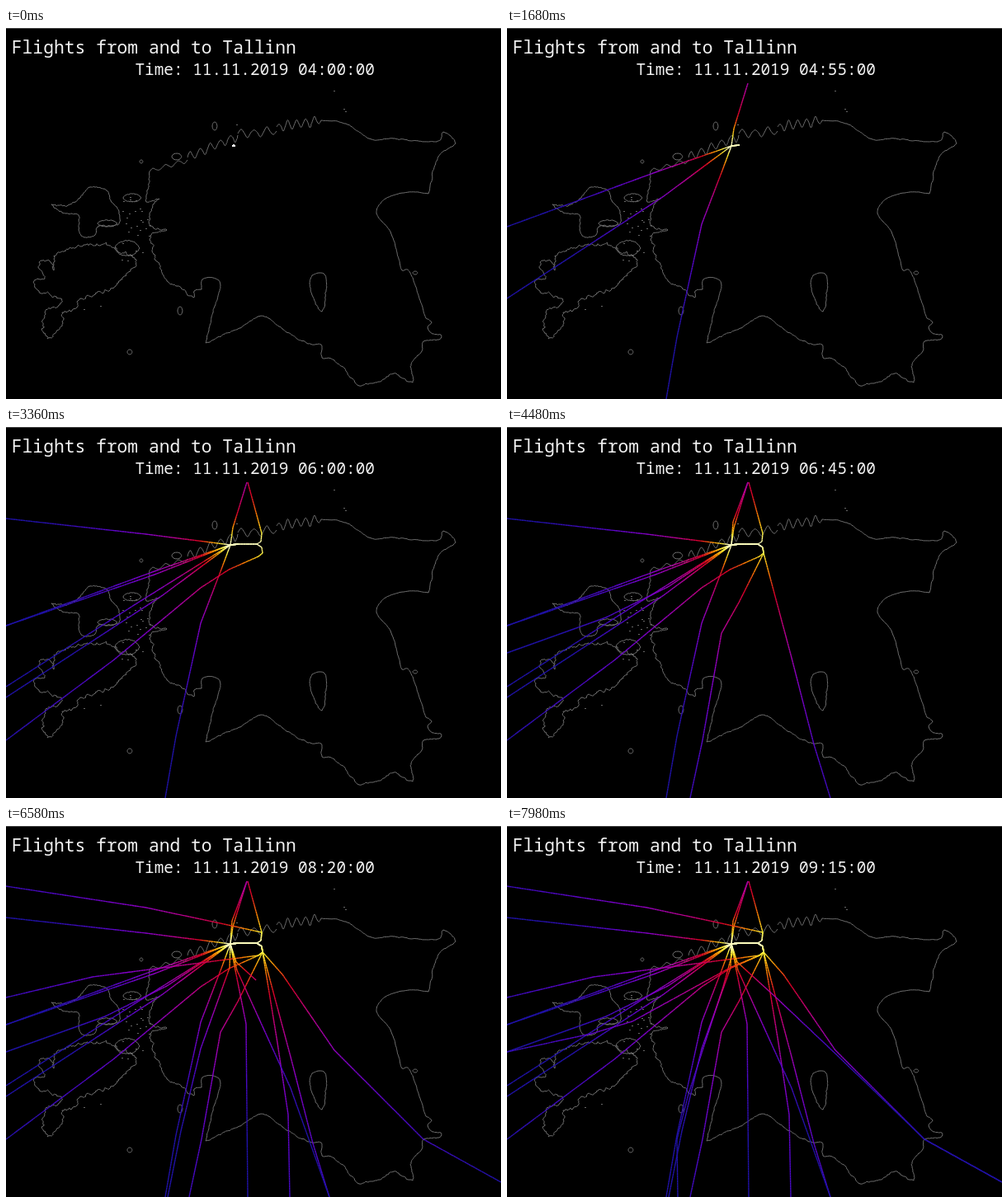
These frames come from a looping animation (600 px wide and 450 px high, 8000 ms). An HTML page with a canvas:

```html
<!DOCTYPE html>
<html lang="en">
<head>
<meta charset="utf-8">
<title>Flights from and to Tallinn</title>
<style>
html, body { margin: 0; width: 100%; height: 100%; overflow: hidden; background: #000; }
canvas { display: block; }
</style>
</head>
<body>
<canvas id="stage" width="600" height="450"></canvas>
<script>
const ctx = document.getElementById('stage').getContext('2d');
const LOOP = 8000, HOLD = 420, BEAT = 140;

let seed = 11;
function rand() {
  seed = (seed * 16807) % 2147483647;
  return seed / 2147483647;
}

const mix = (a, b, u) => a + (b - a) * u;

// ---- map ----
const map = new Path2D();

// midpoint displacement makes a ragged line
function roughen(x1, y1, x2, y2, rough) {
  const dx = x2 - x1, dy = y2 - y1;
  if (Math.hypot(dx, dy) < 2.4) {
    map.lineTo(x2, y2);
    return;
  }
  const shift = (rand() - 0.5) * rough;
  const mx = (x1 + x2) / 2 - dy * shift, my = (y1 + y2) / 2 + dx * shift;
  roughen(x1, y1, mx, my, rough);
  roughen(mx, my, x2, y2, rough);
}

const spline = (a, b, c, d, u) =>
  b + u / 2 * (c - a + u * (2 * a - 5 * b + 4 * c - d + u * (3 * (b - c) + d - a)));

// ragged smooth curve through a few points
function shore(rough, ...p) {
  const n = p.length / 2;
  const at = i => 2 * Math.max(0, Math.min(n - 1, i));
  map.moveTo(p[0], p[1]);
  let [x, y] = p;
  for (let i = 0; i < n - 1; i++) {
    const k = [i - 1, i, i + 1, i + 2].map(at);
    for (let u = 0.25; u <= 1; u += 0.25) {
      const nx = spline(...k.map(j => p[j]), u), ny = spline(...k.map(j => p[j + 1]), u);
      roughen(x, y, nx, ny, rough);
      x = nx;
      y = ny;
    }
  }
}

// capes and inlets on either side of a straight line
function bays(x1, y1, x2, y2, count, depth) {
  const p = [];
  for (let i = 0; i <= count * 4; i++) {
    const u = i / (count * 4);
    const jut = Math.round(Math.sin(i * Math.PI / 2)) * depth * (0.4 + 0.6 * rand());
    p.push(mix(x1, x2, u), mix(y1, y2, u) - jut);
  }
  shore(0.4, ...p);
}

function islet(x, y, rx, ry) {
  const p = [];
  for (let a = 0; a <= 6; a++) p.push(x + rx * Math.cos(a * Math.PI / 3), y + ry * Math.sin(a * Math.PI / 3));
  shore(0.5, ...p);
}

// north shore
bays(174, 174, 220, 160, 3, 4);
bays(220, 157, 281, 130, 5, 8);
bays(281, 128, 328, 125, 3, 6);
bays(328, 120, 382, 112, 5, 7);
shore(0.2, 382, 112, 412, 116, 443, 135, 470, 134, 522, 138, 530, 126, 545, 140, 524, 156, 512, 201);
// eastern lake
shore(0.1, 512, 201, 488, 199, 460, 207, 449, 225, 466, 247, 476, 280, 480, 294, 490, 297, 509, 352);
islet(496, 297, 3, 2);
// southern border
shore(0.4, 509, 352, 516, 357, 511, 363, 517, 371, 527, 372, 525, 378, 506, 380, 504, 392, 491, 408, 493, 430,
  470, 419, 452, 429, 428, 434);
shore(0.25, 428, 434, 398, 403, 383, 400, 382, 384, 366, 383, 335, 365, 318, 352, 305, 350, 281, 365, 242, 382);
// gulf and west shore
shore(0.2, 242, 382, 251, 345, 260, 312, 251, 303, 238, 305, 237, 317);
shore(0.6, 237, 317, 228, 319, 227, 327, 208, 313, 195, 307, 184, 284, 175, 252, 195, 245, 174, 240, 178, 214,
  186, 207, 170, 211, 172, 196, 174, 174);
// western islands
shore(0.5, 55, 214, 75, 215, 90, 206, 102, 193, 122, 197, 127, 209, 137, 223, 135, 239, 112, 240, 108, 251, 95, 254,
  88, 245, 88, 227, 68, 224, 55, 214);
shore(0.8, 47, 304, 40, 284, 53, 283, 58, 294, 61, 275, 95, 263, 125, 264, 158, 281, 142, 302, 125, 319, 90, 328,
  86, 339, 68, 345, 69, 358, 50, 377, 47, 345, 63, 338, 66, 328, 40, 319, 34, 307, 47, 304);
islet(147, 267, 15, 9);
islet(153, 206, 11, 5);
islet(123, 237, 12, 4);
islet(207, 156, 6, 4);
islet(253, 119, 3, 5);
islet(164, 162, 2, 2);
islet(211, 343, 3, 5);
islet(150, 393, 3, 3);
// inland lake
shore(0.3, 371, 300, 379, 297, 387, 300, 388, 318, 383, 344, 372, 326, 368, 310, 371, 300);

const specks = [[397, 76], [409, 98], [411, 101], [279, 117], [94, 341], [114, 337]];
for (let i = 0; i < 30; i++) specks.push([136 + rand() * 38, 204 + rand() * 84]);

function drawMap() {
  ctx.fillStyle = '#000';
  ctx.fillRect(0, 0, 600, 450);
  ctx.fillStyle = '#444';
  ctx.fillRect(0, 0, 600, 1);
  ctx.strokeStyle = '#707070';
  ctx.lineWidth = 1;
  ctx.stroke(map);
  ctx.fillStyle = '#666';
  for (const [x, y] of specks) ctx.fillRect(Math.round(x), Math.round(y), 2, 1);
}

// ---- flights ----
// altitude colours, from the ground up
const ramp = [
  [255, 255, 190], [255, 240, 50], [255, 140, 0], [222, 0, 40],
  [190, 0, 140], [135, 0, 200], [80, 8, 200], [32, 18, 168]
];

// climb is logarithmic in the distance from the airport
function shade(d) {
  const level = Math.max(0, Math.min(ramp.length - 1.001, 1 + Math.log(d / 27) / Math.log(1.5)));
  const i = Math.floor(level);
  return 'rgb(' + ramp[i].map((c, k) => Math.round(mix(c, ramp[i + 1][k], level - i))) + ')';
}

const flights = [];
const PIECE = 3;

// points run outward from the airport; times are in five-minute steps
function trace(p, reach) {
  const pieces = [];
  let total = 0;
  for (let i = 2; i < p.length; i += 2) {
    const [x1, y1, x2, y2] = p.slice(i - 2, i + 2);
    const len = Math.hypot(x2 - x1, y2 - y1), n = Math.ceil(len / PIECE);
    for (let j = 0; j < n; j++) {
      const at = u => [mix(x1, x2, u), mix(y1, y2, u)];
      const mid = total + len * (j + 0.5) / n;
      pieces.push({ from: at(j / n), to: at((j + 1) / n), mid, color: shade(mid / reach) });
    }
    total += len;
  }
  return { pieces, total, time: 3 + total / 110 };
}

function depart(start, ...p) {
  const f = trace([282, 142, 272, 143, ...p], 0.82);
  flights.push({ ...f, start, arrives: false });
}

function arrive(end, gate, ...p) {
  const f = trace([282, 142, 304, 142, ...gate, ...p], 1.45);
  flights.push({ ...f, start: end - f.time, arrives: true });
}

const NORTH = [309, 139, 310, 129];
const SOUTH = [310, 146, 311, 153];
const WEST = [...SOUTH, 306, 157];

depart(0, 262, 170, 236, 238, 206, 375, 193, 450);
depart(4.5, 190, 204, 0, 328);
depart(5, 180, 175, 0, 241);
depart(5.5, 275, 122, 292, 67);
depart(12, 170, 130, 0, 111);
arrive(17, NORTH, 293, 67);
depart(14, 180, 179, 0, 241);
depart(16, 160, 213, 0, 315);
arrive(23.5, WEST, 270, 173, 236, 195, 130, 283, 0, 380);
depart(25, 195, 194, 120, 231, 0, 274);
arrive(32, SOUTH, 281, 213, 260, 250, 237, 380, 222, 450);
arrive(33, SOUTH, 345, 280, 372, 385, 392, 450);
depart(27, 274, 115, 292, 67);
arrive(43, SOUTH, 335, 180, 398, 272, 506, 380, 600, 432);
depart(37.3, 278, 175, 291, 240, 293, 450);
arrive(45.3, NORTH, 255, 117, 170, 99, 0, 73);
arrive(46.2, SOUTH, 329, 263, 342, 350, 344, 450);
depart(45, 271, 172, 236, 270, 212, 370, 196, 450);
arrive(51.5, WEST, 190, 172, 105, 183, 0, 208);
depart(45, 280, 175, 345, 318, 392, 450);
depart(50.4, 279, 165, 325, 207, 398, 276, 506, 380, 600, 432);
depart(53, 273, 155, 262, 195, 220, 325, 206, 380, 207, 450);
arrive(61, WEST, 272, 171, 152, 237, 102, 252, 0, 274);

function drawFlight(f, step) {
  const u = Math.max(0, Math.min(1, (step - f.start) / f.time));
  const flown = f.total * (f.arrives ? Math.pow(1 - u, 1.3) : Math.pow(u, 1.3));
  for (const s of f.pieces) {
    if (f.arrives ? s.mid < flown : s.mid > flown) continue;
    ctx.strokeStyle = s.color;
    ctx.beginPath();
    ctx.moveTo(...s.from);
    ctx.lineTo(...s.to);
    ctx.stroke();
  }
}

// ---- clock ----
// [picture, five-minute step]
const pace = [[0, 0], [10, 11], [22, 24], [30, 33], [38, 43], [45, 52], [55, 63]];

function stepAt(n) {
  const i = Math.max(1, pace.findIndex(key => key[0] >= n));
  const [a, from] = pace[i - 1], [b, to] = pace[i];
  return Math.floor(mix(from, to, (n - a) / (b - a)) + 1e-6);
}

function drawText(step) {
  const two = n => String(n).padStart(2, '0');
  const min = step * 5;
  const family = 'px "Noto Sans Mono", "DejaVu Sans Mono", monospace';
  ctx.fillStyle = '#f2f2f2';
  ctx.font = 21.3 + family;
  ctx.fillText('Flights from and to Tallinn', 6.8, 31);
  ctx.font = 19.37 + family;
  ctx.fillText(`Time: 11.11.2019 ${two(4 + Math.floor(min / 60))}:${two(min % 60)}:00`, 156.5, 57);
}

function draw(step) {
  drawMap();
  ctx.lineWidth = 1.4;
  for (const f of flights) drawFlight(f, step);
  if (step === 0) {
    ctx.fillStyle = '#fff';
    ctx.fillRect(275, 141, 2, 1);
    ctx.fillRect(274, 142, 4, 2);
  }
  drawText(step);
}

let shown = -1;
const begin = performance.now();

function tick() {
  const t = (performance.now() - begin) % LOOP;
  const picture = t < HOLD ? 0 : Math.floor((t - HOLD) / BEAT) + 1;
  if (picture !== shown) {
    shown = picture;
    draw(stepAt(picture));
  }
  requestAnimationFrame(tick);
}
tick();
</script>
</body>
</html>
```
